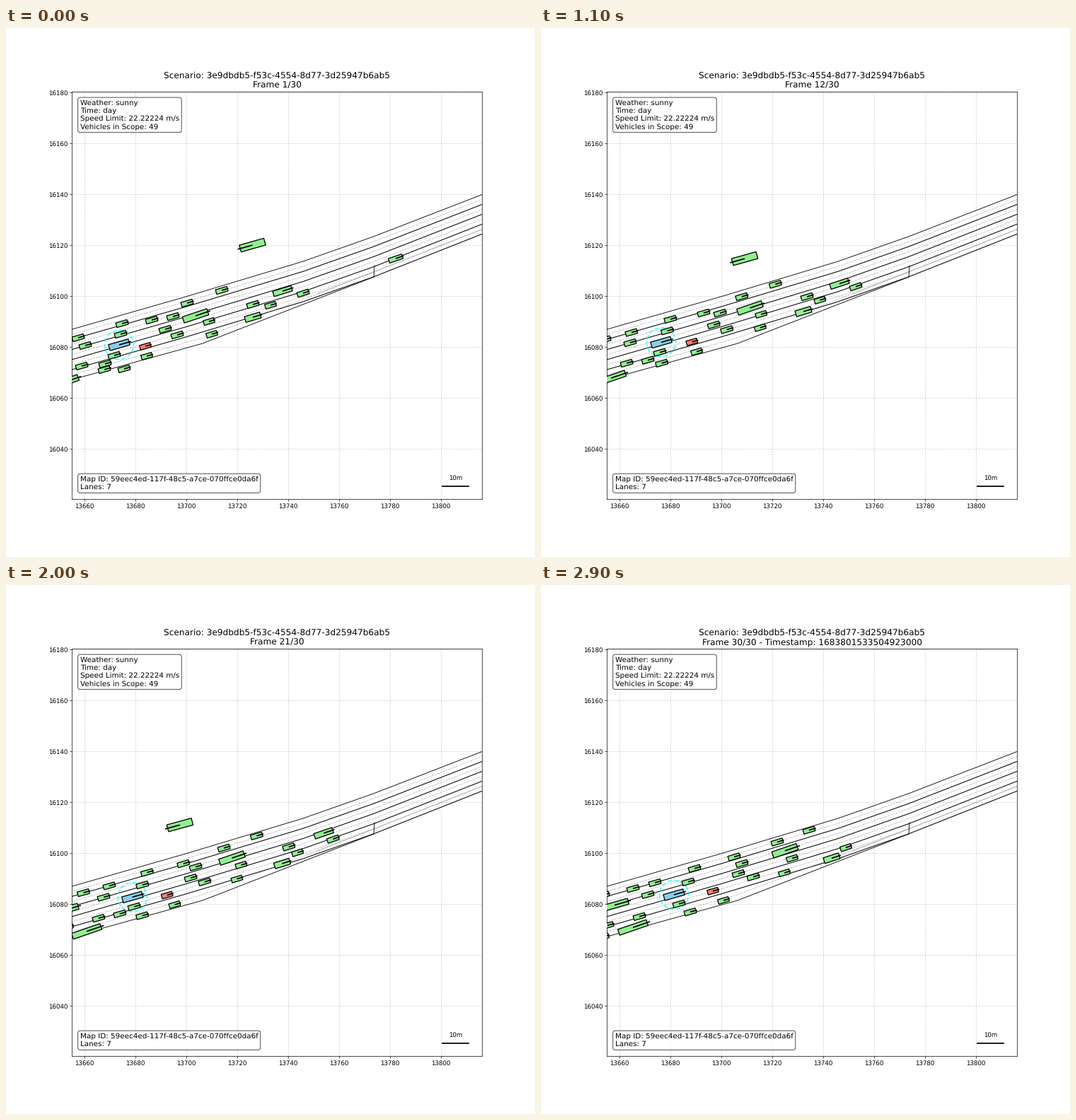
A matplotlib script for the animation above (3 s loop, 748 by 748 pixels).

```python
import numpy as np
import matplotlib.pyplot as plt
from matplotlib.animation import FuncAnimation
from matplotlib.patches import Circle, Polygon
from matplotlib.transforms import Affine2D

plt.rcParams["font.family"] = "DejaVu Sans"
plt.rcParams["text.hinting"] = "none"

SIZE, FRAMES = 748, 30
SCALE = 3.6                       # pixels per metre
LEFT, TOP = 93.2, 0.12 * SIZE
WIDTH, HEIGHT = 0.775 * SIZE, 0.77 * SIZE
X_MIN, Y_MAX = 13655.06, 16180.42

fig = plt.figure(figsize=(12, 12), dpi=SIZE / 12, facecolor="white")
ax = fig.add_axes([LEFT / SIZE, 0.11, 0.775, 0.77])
ax.set_xlim(X_MIN, X_MIN + WIDTH / SCALE)
ax.set_ylim(Y_MAX - HEIGHT / SCALE, Y_MAX)
ax.set_xticks(range(13660, 13801, 20))
ax.set_yticks(range(16040, 16181, 20))
ax.ticklabel_format(useOffset=False, style="plain")
ax.grid(True, linestyle="--", alpha=0.6)
title = ax.set_title("", fontsize=14)

# Stage pixels (y down) to map coordinates
STAGE = (Affine2D().translate(-LEFT, -TOP).scale(1 / SCALE, -1 / SCALE)
         .translate(X_MIN, Y_MAX) + ax.transData)


def stroke(xs, ys, color="black", lw=1.0, **kw):
    return ax.plot(xs, ys, color=color, lw=lw, transform=STAGE,
                   scalex=False, scaley=False, **kw)[0]


# The road: an upper edge, a lower edge and evenly spread lanes between
ROAD_X = np.array([0, 255, 420, 520, 674])
UPPER = np.array([452.8, 379.7, 330, 294.8, 235.2])
LOWER = np.array([509.8, 436.7, 387, 351.8, 291])
DIVIDER = dict(color="gray", lw=0.9, alpha=0.6)


def road(x):
    return np.interp(x, ROAD_X, UPPER)


def lane(k):
    return UPPER + (LOWER - UPPER) * k / 4


for k in range(5):
    stroke(ROAD_X, lane(k), lw=1.2 if k else 1.0)
    if k < 4:
        stroke(ROAD_X, lane(k + 0.5), linestyle="--", **DIVIDER)

# Merging lane at the bottom
stroke([93, 278, 520], [497.3, 446, 352])
stroke([93, 278, 520], [490.3, 438, 345], linestyle="--", **DIVIDER)
stroke([440, 520, 674], [376, 345, 284.5], **DIVIDER)
stroke([521, 520], [336, 352])


class Vehicle:
    """A box that follows the bend of the road, with some sideways drift."""

    def __init__(self, x, y, travel, drift=0, length=16.6, width=6.7,
                 color="lightgreen", last=FRAMES - 1, tilt=0,
                 braking=False, oncoming=False):
        self.start, self.travel, self.drift = (x, y), travel, drift
        self.length, self.width, self.last = length, width, last
        self.bend = 0.25 if braking else -0.1
        self.tilt, self.sign = np.radians(tilt), -1 if oncoming else 1
        self.body = Polygon(np.zeros((4, 2)), closed=True, facecolor=color,
                            edgecolor="black", lw=1.5, zorder=5,
                            transform=STAGE)
        ax.add_patch(self.body)
        self.arrow = stroke([], [], lw=2, zorder=6, solid_capstyle="butt")

    def position(self, i):
        t = i / (FRAMES - 1)
        u = t * (1 + self.bend * (1 - t))
        x0, y0 = self.start
        x = x0 + self.travel * u
        return np.array([x, y0 + road(x) - road(x0) - self.drift * u])

    def draw(self, i):
        shown = i <= self.last
        self.body.set_visible(shown)
        self.arrow.set_visible(shown)
        pos = self.position(i)
        x = max(pos[0], LEFT)
        angle = np.arctan((road(x - 40) - road(x + 40)) / 80) + self.tilt
        ahead = np.array([np.cos(angle), -np.sin(angle)])
        side = np.array([np.sin(angle), np.cos(angle)])
        a, b = ahead * self.length / 2, side * self.width / 2
        self.body.set_xy([pos + a + b, pos + a - b, pos - a - b, pos - a + b])
        tip = pos + self.sign * 0.6 * self.length * ahead
        self.arrow.set_data([pos[0], tip[0]], [pos[1], tip[1]])


fleet = []


def add(*path, **kw):
    fleet.append(Vehicle(*path, **kw))
    return fleet[-1]


# Ordinary cars: start x, start y, distance travelled, drift
for path in [(305, 371, 74, 2), (256, 389, 78, 2), (206, 413, 67, 9),
             (236, 408, 48), (164, 418, 53, 2), (68, 447, 62), (20, 458, 68)]:
    add(*path)
for path in [(162, 433, 46), (112, 449, 39), (225, 426, 54, 2),
             (242, 434, 58, 4), (153, 463, 42), (71, 488, 23)]:
    add(*path)
for path in [(287, 415, 68, 8), (291, 433, 53, 10), (374, 392, 57, 3),
             (199, 464, 59, 1), (20, 517, 68)]:
    add(*path, length=15.5)
for path in [(102, 438, 59), (107, 478, 32), (139, 483, 72)]:
    add(*path, braking=True)

# Cars that leave the scene early
add(349, 391, 76, 8, last=27)
add(420, 375, 57, 1, last=27, braking=True)
add(140, 475, 31, 6, last=27)
add(167, 482, 87, last=2)
add(551, 326, 100, length=20, last=1, tilt=-2)

# Vans, buses and trucks
add(349, 409, 62, 4, length=22.5, width=8.4)
add(391, 372, 87, 3, length=27, width=7.8, last=27)
add(268, 407, 77, 8, length=36.5, width=9.1, tilt=2)
add(82, 501, 48, 3, length=42.5, width=8.6, tilt=3)
add(40, 474, 64, 3, length=40, width=8.4)
add(348.5, 307, -138, -2, length=36, width=10, last=27, tilt=-1,
    braking=True, oncoming=True)

# Marked car and ego vehicle
add(197, 450, 46, 4, length=15.5, color="salmon")
ego = add(160, 448, 28, 2, length=29, width=8.7, color="skyblue")
ring = Circle((0, 0), 20.5, fill=False, edgecolor="cyan", lw=2, alpha=0.7,
              linestyle="--", zorder=4, transform=STAGE)
ax.add_patch(ring)


def note(y, va, text):
    box = dict(boxstyle="round", facecolor="white", alpha=0.8)
    ax.text(0.02, y, text, transform=ax.transAxes, va=va, fontsize=12.06,
            bbox=box, zorder=10)


note(0.98, "top", "Weather: sunny\nTime: day\n"
     "Speed Limit: 22.22224 m/s\nVehicles in Scope: 49")
note(0.02, "bottom", "Map ID: 59eec4ed-117f-48c5-a7ce-070ffce0da6f\nLanes: 7")

stroke([617.4, 653.6], [648, 648], lw=2, zorder=10)
ax.text(635.5, 638.6, "10m", transform=STAGE, ha="center", va="baseline",
        fontsize=10, zorder=10)


def update(i):
    text = f"Scenario: 3e9dbdb5-f53c-4554-8d77-3d25947b6ab5\nFrame {i + 1}/{FRAMES}"
    if i == FRAMES - 1:
        text += " - Timestamp: 1683801533504923000"
    title.set_text(text)
    for vehicle in fleet:
        vehicle.draw(i)
    ring.center = ego.position(i)
    return []


anim = FuncAnimation(fig, update, frames=FRAMES, interval=100,
                     init_func=lambda: update(0), repeat=True, repeat_delay=0)
plt.show()
```
